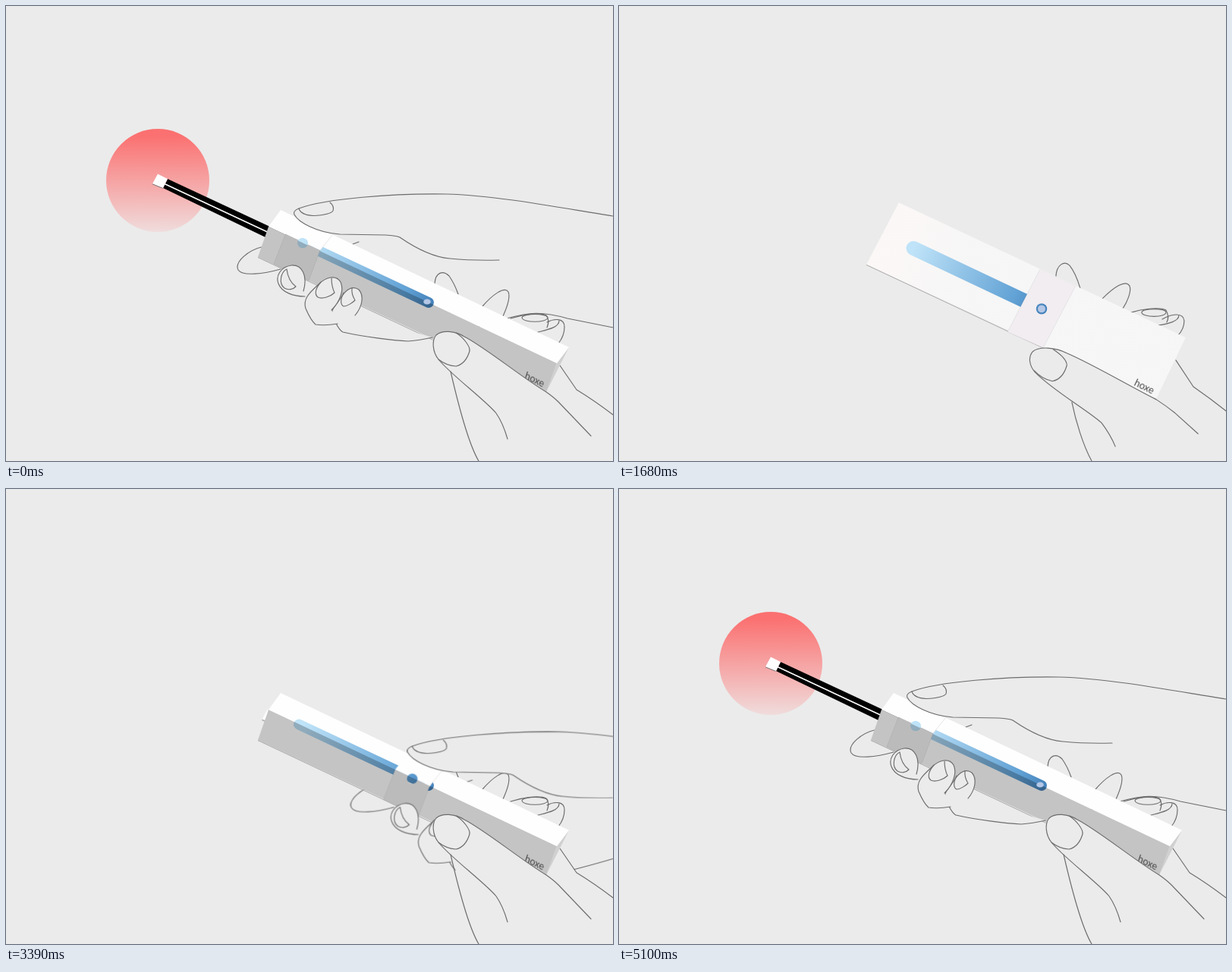
Recreate the animation shown at these times as an HTML page. Size 800x600 px, loop 5490 ms.

```html
<!DOCTYPE html>
<html lang="en">
<head>
<meta charset="utf-8">
<title>Handheld tester</title>
<style>
html, body { margin: 0; width: 100%; height: 100%; overflow: hidden; background: #ebebeb; }
svg { display: block; width: 800px; height: 600px; }
svg * { animation: 5490ms linear infinite; }

.line { fill: none; stroke: #6c6c6c; stroke-width: 1.15; stroke-linecap: round; stroke-linejoin: round; }
.skin { fill: #ebebeb; }
.front { --a: path('M369 259L747 437L708 518L326 341Z'); --b: path('M346 291L726 471L712 509L332 331Z'); }
.bar { --a: path('M388 319.5L557 399.5'); --b: path('M386 310.5L557 391'); fill: none; stroke-linecap: round; }
.brand { font: 13px Lato, "Open Sans", sans-serif; fill: #444; }

.morph { animation-name: morph; }
.bar { animation-name: morph, thin; }
.tint { animation-name: tint; }
.cover { animation-name: morph, cover; }
.oval { animation-name: oval; }
.shade { animation-name: shade; }
.brand { animation-name: brand; }
.rig { animation-name: swing; transform-origin: 755px 715px; }
.slide { animation-name: slide; }
.stick { animation-name: push; }
.pull { animation-name: pull; }
.thumb { animation-name: thumb; transform-origin: 380px 275px; }
.grip { animation-name: grip; transform-origin: 305px 345px; }
.disc { animation-name: glow; }

/* flat view (a) turns into the solid view (b) */
@keyframes morph {
  0%, 1.092% { d: var(--b); }
  1.093%, 30.05% { d: var(--a); animation-timing-function: ease-in-out; }
  37.16%, 100% { d: var(--b); }
}
@keyframes thin {
  0%, 1.092% { stroke-width: 14px; }
  1.093%, 30.05% { stroke-width: 19px; animation-timing-function: ease-in-out; }
  37.16%, 100% { stroke-width: 14px; }
}
@keyframes tint {
  0%, 1.092% { stop-color: #c4c4c4; }
  1.093%, 30.05% { stop-color: var(--c); animation-timing-function: ease-in-out; }
  37.16%, 100% { stop-color: #c4c4c4; }
}
@keyframes cover {
  0%, 1.092% { fill: #bbb; }
  1.093%, 30.05% { fill: #f2eef2; animation-timing-function: ease-in-out; }
  37.16%, 100% { fill: #bbb; }
}
@keyframes oval {
  0%, 1.092% { cx: 555px; cy: var(--y); rx: var(--rx); ry: var(--ry); }
  1.093%, 30.05% { cx: 557px; cy: 399.5px; rx: var(--r); ry: var(--r); animation-timing-function: ease-in-out; }
  37.16%, 100% { cx: 555px; cy: var(--y); rx: var(--rx); ry: var(--ry); }
}
@keyframes shade {
  0%, 1.092% { opacity: .24; }
  1.093%, 30.05% { opacity: 0; animation-timing-function: ease-in-out; }
  37.16%, 100% { opacity: .24; }
}
@keyframes brand {
  0%, 1.092% { transform: translate(683px, 491px) rotate(26deg) skewX(8deg); }
  1.093%, 30.05% { transform: translate(678px, 500px) rotate(26deg) skewX(0deg); animation-timing-function: ease-in-out; }
  37.16%, 100% { transform: translate(683px, 491px) rotate(26deg) skewX(8deg); }
}
@keyframes swing {
  0%, 1.092% { transform: rotate(0deg); }
  1.093% { transform: rotate(-90deg); animation-timing-function: cubic-bezier(.3, .3, .3, 1); }
  12.57% { transform: rotate(2.3deg); animation-timing-function: ease-in-out; }
  21.86%, 100% { transform: rotate(0deg); }
}
@keyframes slide {
  0%, 1.092% { transform: translate(-164px, -79px); }
  1.093%, 56.28% { transform: translate(0px, 0px); animation-timing-function: cubic-bezier(.65, 0, .35, 1); }
  74.14%, 100% { transform: translate(-164px, -79px); }
}
@keyframes push {
  0%, 1.092% { transform: translate(0px, 0px); }
  1.093%, 56.28% { transform: translate(164px, 79px); animation-timing-function: cubic-bezier(.65, 0, .35, 1); }
  74.14%, 100% { transform: translate(0px, 0px); }
}
@keyframes pull {
  0%, 1.092% { transform: translate(0px, 0px); visibility: visible; }
  1.093%, 42.3% { transform: translate(169px, 82px); visibility: hidden; }
  42.35%, 56.28% { transform: translate(169px, 82px); visibility: visible; animation-timing-function: cubic-bezier(.65, 0, .35, 1); }
  74.14%, 100% { transform: translate(0px, 0px); visibility: visible; }
}
@keyframes thumb {
  0%, 1.092% { transform: translate(0px, 0px) rotate(0deg); }
  1.093%, 42.35% { transform: translate(305px, 3px) rotate(27deg); animation-timing-function: cubic-bezier(.33, 1, .68, 1); }
  64.48%, 100% { transform: translate(0px, 0px) rotate(0deg); }
}
@keyframes grip {
  0%, 1.092% { transform: translate(0px, 0px) rotate(0deg); }
  1.093%, 42.35% { transform: translate(350px, 158px) rotate(50deg); animation-timing-function: cubic-bezier(.33, 1, .68, 1); }
  64.48%, 100% { transform: translate(0px, 0px) rotate(0deg); }
}
@keyframes glow {
  0%, 1.092% { opacity: 1; }
  1.093%, 83.88% { opacity: 0; animation-timing-function: ease-in-out; }
  92.9%, 100% { opacity: 1; }
}
</style>
</head>
<body>
<svg viewBox="0 0 800 600">
  <defs>
    <linearGradient id="red" x1="0" y1="0" x2="0" y2="1">
      <stop offset=".06" stop-color="#fb7070"/>
      <stop offset="1" stop-color="#f0dcdc"/>
    </linearGradient>
    <linearGradient id="face" gradientUnits="userSpaceOnUse" x1="345" y1="300" x2="450" y2="350">
      <stop class="tint" offset=".3" style="--c:#fbf8f7"/>
      <stop class="tint" offset="1" style="--c:#f7f7f7"/>
    </linearGradient>
    <linearGradient id="blue" gradientUnits="userSpaceOnUse" x1="382" y1="310" x2="560" y2="394">
      <stop offset=".05" stop-color="#bfe3f8"/>
      <stop offset=".8" stop-color="#62a2d5"/>
      <stop offset="1" stop-color="#4583bb"/>
    </linearGradient>
    <clipPath id="side"><path class="front morph"/></clipPath>
    <mask id="hole" maskUnits="userSpaceOnUse" x="0" y="0" width="800" height="600">
      <rect width="800" height="600" fill="#fff"/>
      <ellipse class="oval" style="--r:7.2px;--rx:7px;--ry:6.8px;--y:391.5px"/>
    </mask>
  </defs>

  <circle class="disc" cx="200" cy="230" r="68" fill="url(#red)"/>

  <g class="rig">
    <!-- right hand, behind the device -->
    <g class="pull"><g class="grip line">
      <path d="M362 347C340 353 312 357 306 348C301 338 318 322 340 317"/>
      <path d="M457 314L465 311"/>
      <path d="M562 437C600 430 630 420 660 412C690 404 705 402 740 412L800 424L870 436"/>
    </g></g>

    <!-- left hand, behind the device -->
    <path class="skin" d="M731 476L752 507Q776 521 801 540V600L771 567L728 522L712 509Z"/>
    <g class="line">
      <path class="morph" style="--a:path('M576 356C577 341 587 335 594 342Q602 352 608 372');--b:path('M565 366C566 351 576 348 584 356Q591 366 596 380')"/>
      <path class="morph" style="--a:path('M637 386C652 371 668 360 673 369C676 376 670 390 664 399');--b:path('M628 396C641 381 657 369 662 377C665 384 660 398 655 409')"/>
      <path class="morph" style="--a:path('M675 404C688 400 712 396 721 401Q726 410 722 417');--b:path('M665 412C677 408 702 403 712 408Q717 415 713 424')"/>
      <path class="morph" style="--a:path('M689 404C690 398 721 398 721 404C721 411 690 411 689 404Z');--b:path('M680 411C681 405 714 405 714 411C713 418 681 418 680 411Z')"/>
      <path class="morph" style="--a:path('M716 413C729 405 744 404 745 415C745 423 741 430 737 434');--b:path('M713 417C722 412 736 411 736 423C736 432 732 440 728 445')"/>
      <path class="morph" style="--a:path('M711 421C723 419 738 416 738 408');--b:path('M701 430C713 427 729 424 729 415')"/>
      <path class="morph" style="--a:path('M734 467L757 502Q780 518 800 534L900 610');--b:path('M730 474L752 506Q775 520 800 539L900 614')"/>
    </g>

    <!-- test strip -->
    <g class="stick">
      <path d="M213 228L348 291L510 369L510 383L342 305L207 240Z"/>
      <path d="M209 234.5L510 375.5" stroke="#fff" stroke-width="1.6"/>
      <path d="M200 221.5L213 228L207 240L193 234.5Z" fill="#fff"/>
      <path d="M193 234.8L206.5 240.3" stroke="#777"/>
    </g>

    <!-- device -->
    <path class="morph" fill="#d0d0d0" style="--a:path('M747 437L747 437L708 518Z');--b:path('M726 471L742 450L712 509Z')"/>
    <path class="front morph" fill="url(#face)"/>
    <path class="morph" fill="#fefefe" style="--a:path('M369 259L747 437L747 437L369 259Z');--b:path('M362 269L742 450L726 471L346 291Z')"/>
    <path class="morph" fill="none" stroke="#a9a9a9" style="--a:path('M326 341.5L559 451');--b:path('M332 331.5L565 441.5')"/>
    <path class="bar" stroke="url(#blue)"/>
    <g clip-path="url(#side)"><g class="shade"><path class="bar" stroke="#000"/></g></g>
    <ellipse class="oval" fill="#b4c7e6" style="--r:5px;--rx:4.8px;--ry:3.6px;--y:390px"/>
    <text class="brand">hoxe</text>

    <g class="slide"><g mask="url(#hole)">
      <path class="cover" stroke="#000" stroke-opacity=".06" style="--a:path('M555 347L602 369L559 451L512 430Z');--b:path('M532.5 379.5L578 401L563 441L517 419Z')"/>
      <path class="morph" fill="#fefefe" style="--a:path('M555 347L602 369L602 369L555 347Z');--b:path('M549 358L595 380L578 401L532.5 379.5Z')"/>
      <path class="morph" fill="none" stroke="#e6e6e6" style="--a:path('M602 369L602 369');--b:path('M595 380L578 401')"/>
    </g></g>

    <!-- right hand, in front -->
    <g class="pull">
      <g class="grip line">
        <path class="skin" d="M460 408C470 396 472 382 465 374C457 368 448 374 442 384C434 395 427 402 430 408Q438 427 444 430C470 436 510 441 530 442Q545 441 562 437"/>
        <path d="M445 378C440 388 441 394 445 396C450 396 457 391 460 388Q455 380 456 372"/>
        <path class="skin" d="M429 401C440 390 446 375 441 364C435 354 422 357 412 367C400 378 391 386 395 399Q402 415 408 420Q420 422 437 419"/>
        <path d="M415 364C408 372 406 380 411 384C417 387 428 383 433 378Q429 370 429 359"/>
        <path class="skin" d="M392 376C398 355 390 341 376 342C362 344 355 356 359 366C363 377 378 383 394 383"/>
        <path d="M370 347C362 351 359 366 367 372C372 375 378 374 382 370C374 364 371 356 370 347"/>
      </g>
      <g class="thumb line">
        <path class="skin" d="M860 286L800 277C735 267 650 250 580 248C510 247 420 254 386 267Q378 270 380 275C385 285 410 299 440 301L500 302Q515 303 519 305C535 316 560 331 585 333Q615 336 650 335"/>
        <path d="M386 267C388 274 396 276 405 276.5C415 276 428 275 431 270Q433 264 427 259"/>
      </g>
    </g>

    <!-- left hand, in front -->
    <path class="skin" d="M587 484L623 600H800L771 567L728 522L646 500Z"/>
    <g class="line">
      <path class="skin morph" style="--a:path('M654 581Q648 566 636 550C620 535 570 506 548 483C540 474 539 463 545 456C553 449 575 450 590 458C625 473 670 500 708 519Q722 528 733 537L763 564');--b:path('M661 571Q655 550 646 537C632 520 585 485 570 466C562 456 561 441 567 434C574 427 592 428 604 436C630 449 680 490 712 509Q722 516 728 522L771 567')"/>
      <path class="morph" style="--a:path('M572 453C584 461 590 468 590 474Q585 492 571 495Q557 492 547 481');--b:path('M593 431C603 437 612 449 611 455Q606 472 593 475Q580 474 570 466')"/>
      <path class="morph" style="--a:path('M597 523C602 548 612 580 623 600L655 660');--b:path('M586 482C592 508 608 575 623 600L655 660')"/>
    </g>
  </g>
</svg>
</body>
</html>
```
